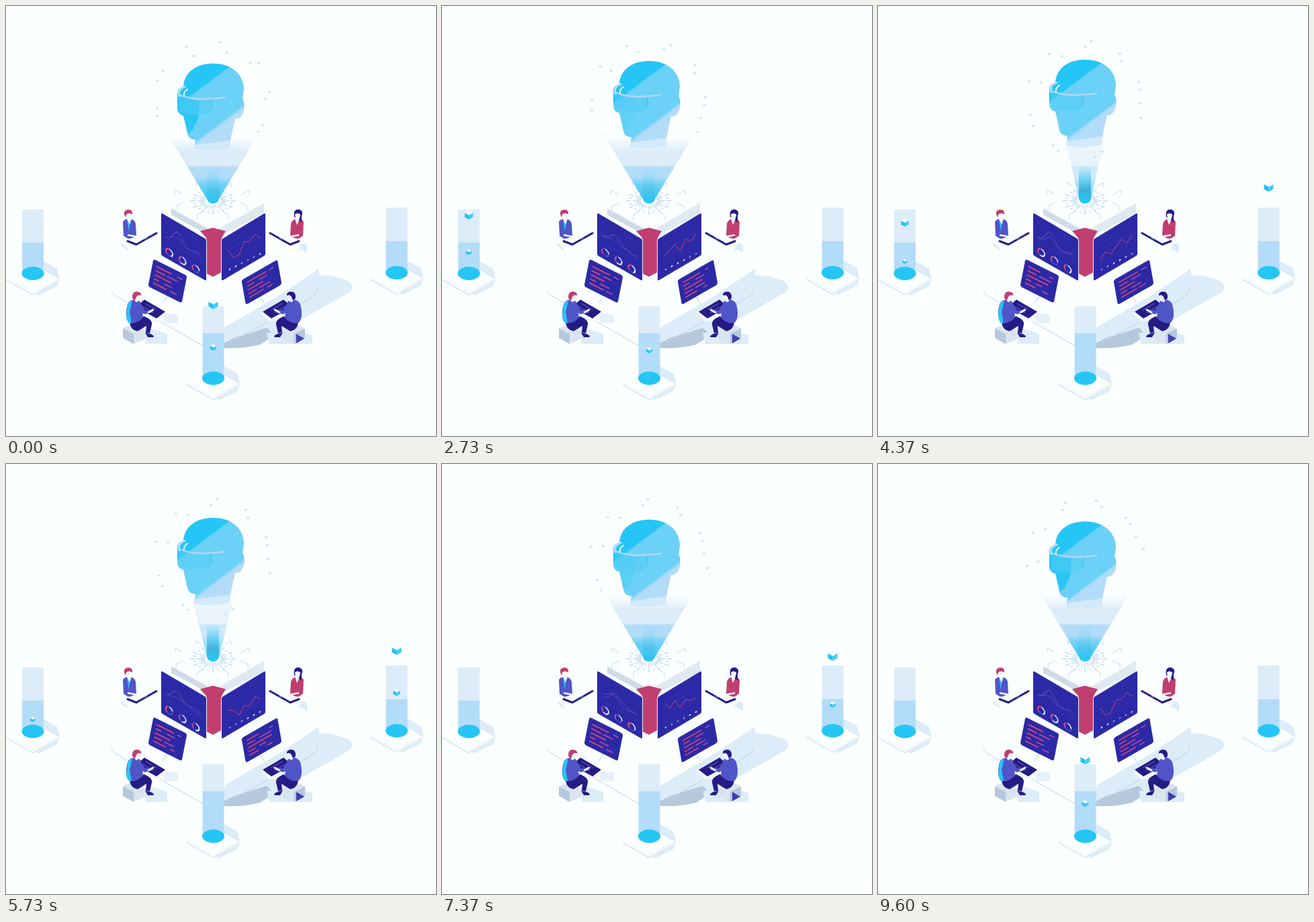
Write an HTML page that moves like this. It is 640 px wide and 640 px high and loops after 9.63 s.

```html
<!DOCTYPE html>
<html lang="en">
<head>
<meta charset="utf-8">
<title>Hologram lab</title>
<style>
  html, body { margin: 0; width: 100%; height: 100%; overflow: hidden; background: #fcffff; }
  svg { display: block; width: 100vw; height: 100vh; }
</style>
</head>
<body>
<svg id="stage" viewBox="0 0 640 640" fill="none"></svg>
<script>
const LOOP = 9630;
const C = {
  bg: '#fcffff', pale: '#dcecf8', soft: '#b3dcf9', mid: '#6bd1f6', bright: '#25c6f5', edge: '#bfd2e4',
  shade: '#b5c8dc', navy: '#251b84', screen: '#2b29a6', blue: '#5055c8', pink: '#c03f70', hot: '#e6496f'
};
const stage = document.getElementById('stage');
const shape = (d, fill, extra = '') => `<path d="${d}" fill="${fill}" ${extra}/>`;
const line = (d, stroke, width = 1, extra = '') =>
  `<path d="${d}" stroke="${stroke}" stroke-width="${width}" stroke-linecap="round" stroke-linejoin="round" ${extra}/>`;
const mirror = (x, body) => `<g transform="translate(${x} 0) scale(-1 1)">${body}</g>`;
const range = n => [...Array(n).keys()];
const times = (n, fn) => range(n).map(fn).join('');

// Projector pillars: x, top, colour split, disc height, chevron launch times (s)
const pillars = [
  { x: 40, top: 303, split: 352, disc: 398, launch: [1, 1.695, 2.26, 3.15, 3.8, 4.51] },
  { x: 581.5, top: 300, split: 350, disc: 397, launch: [4.22, 4.98, 5.525, 6.42, 7.1] },
  { x: 308.5, top: 447, split: 487, disc: 554, launch: [8.76, 9.35, 10.09, 10.79, 11.44] }
];
const FALL = 1.3;

function pillar({ x, top, split, disc, launch }, i) {
  const y = disc + 10;
  return shape(`M${x + 14} ${y - 29}L${x + 36} ${y - 17}L${x + 40} ${y - 1}L${x + 36} ${y + 9}L${x + 8} ${y + 23}L${x} ${y + 16}Z`, C.pale) +
    shape(`M${x - 40} ${y - 1}L${x} ${y - 23}L${x + 40} ${y - 1}V${y + 1}L${x} ${y + 23}L${x - 40} ${y + 1}Z`, C.bg) +
    line(`M${x - 39} ${y}L${x} ${y + 22}L${x + 39} ${y}`, C.edge) +
    line(`M${x - 39} ${y - 3}L${x} ${y + 18}L${x + 39} ${y - 3}`, '#e6f1f8', .8) +
    shape(`M${x - 16} ${top}h32V${split}h-32z`, C.pale) +
    shape(`M${x - 16} ${split}h32V${disc}h-32z`, C.soft) +
    `<ellipse cx="${x}" cy="${disc}" rx="16.5" ry="10" fill="${C.bright}"/>` +
    launch.map((_, n) => `<g id="chev${i}-${n}">${shape('M-7 -4L0 -8L7 -4L0 0Z', '#f4fbff')}` +
      shape('M-7 -4L0 0V7L-7 3Z', '#1fc0f2') + shape('M7 -4L0 0V7L7 3Z', '#3fccf6') + '</g>').join('');
}

const defs = `<defs>
  <linearGradient id="skin" gradientUnits="userSpaceOnUse" x1="264" y1="85" x2="336" y2="181">
    <stop offset=".37" stop-color="${C.bright}"/><stop offset=".39" stop-color="${C.mid}"/>
    <stop offset=".86" stop-color="${C.mid}"/><stop offset=".9" stop-color="${C.soft}"/></linearGradient>
  <linearGradient id="beam" gradientUnits="userSpaceOnUse" x1="0" y1="195" x2="0" y2="294">
    <stop stop-color="${C.pale}" stop-opacity="0"/><stop offset=".22" stop-color="${C.pale}"/><stop offset=".42" stop-color="${C.pale}"/>
    <stop offset=".46" stop-color="${C.soft}"/><stop offset=".6" stop-color="${C.soft}"/>
    <stop offset=".72" stop-color="${C.mid}"/><stop offset="1" stop-color="${C.bright}"/></linearGradient>
  <linearGradient id="core" gradientUnits="userSpaceOnUse" x1="0" y1="238" x2="0" y2="290">
    <stop stop-color="${C.mid}" stop-opacity="0"/><stop offset=".4" stop-color="${C.mid}"/>
    <stop offset=".7" stop-color="#3fb0d6"/><stop offset="1" stop-color="${C.bright}"/></linearGradient>
</defs>`;

const floor =
  shape('M157 422L308 335L465 422L330 500Q309 512 290 503Z', C.bg) +
  shape('M313 508L326 478L408 430L466 391V401L486 402L508 409Q524 419 506 429L420 478L400 490Q375 512 313 509Z', C.pale) +
  shape('M312 508L340 494L388 479L400 490L378 504Q348 512 312 508Z', C.shade) +
  line('M157 424Q159 430 168 434L290 504Q309 514 330 503L456 433Q465 428 464 421', C.edge);

const rays = times(24, i => {
  const a = i * Math.PI / 12, c = Math.cos(a), s = Math.sin(a);
  const seg = (r, q) => `M${308 + r * c} ${290 + r * s * .58}L${308 + q * c} ${290 + q * s * .58}`;
  return line(seg(13, i % 2 ? 19 : 23) + seg(27, i % 2 ? 29 : 33), '#cfe3f4', 2);
});

const platform =
  shape('M246 300L308 265L384 293V308L308 345L246 310Z', C.bg) +
  shape('M246 301L305 334V343L246 311Z', '#cfdbe6') +
  shape('M384 293V309L314 345V334Z', '#dfe9f1') +
  line('M246 301L305 333L314 333L384 293', '#edf4f9') +
  line('M252 280v-6l10 6M362 280v-6l-12 7M253 304v-6l10-5M360 304v-6l-11-5M285 318v-8l8-4M331 318v-7l-8-5M283 268v-5l7 5M335 270v-7l-8 5', '#c9dbe9') +
  rays +
  shape('M289 335L308 330L327 335L321 345V396L308 403L298 398V345Z', C.pink);

const monitor = d => shape(d, C.screen, 'stroke="#f1f6fd" stroke-width="2" stroke-linejoin="round" paint-order="stroke"');

const charts =
  monitor('M233 309L296 346Q298 347 298 349V407Q298 409 296 408L233 372Q231 371 231 369V310Q231 308 233 309Z') +
  monitor('M384 309L323 346Q321 347 321 349V407Q321 409 323 408L384 372Q386 371 386 369V310Q386 308 384 309Z') +
  `<g transform="matrix(1 .567 0 1 231 309)">
    ${line('M7 9h16M46 9h14M8 38h52', '#4541bb', 1, 'stroke-dasharray="2 3"')}
    <path id="waveA" stroke="#7444b2"/><path id="waveB" stroke="#4f48c2"/>
    ${times(3, i => `<g transform="translate(${12 + i * 19.7} ${51 + i}) rotate(-90)" stroke-width="1.8">
      <circle r="5" stroke="#4a4cc4"/><circle class="ringA" r="5" stroke="#e8e9fb"/><circle class="ringB" r="5" stroke="${C.hot}"/></g>`)}
  </g>
  <g transform="matrix(1 -.58 0 1 321 347)">
    ${times(4, i => line(`M9 ${13 + i * 9}H58`, '#403dba', .7, 'stroke-dasharray="2 2"'))}
    ${times(6, i => `<circle cx="${12 + i * 9}" cy="${52 + i * .6}" r="1.3" fill="#e9ebff" class="tick"/>`)}
  </g>
  <path id="trend" stroke="#cc416f" stroke-linejoin="round"/>`;

const rows = [[28, 8], [14, 18], [33, 0], [12, 15], [22, 10]];
const codeScreen = (matrix, id) => `<g transform="matrix(${matrix})">
  <rect width="50" height="40" rx="3" fill="${C.screen}"/>
  ${rows.map(([a, b], i) => `<g class="${id}" stroke-width="1.7">
    <path stroke="${C.hot}" d="M6 ${8 + i * 6}h${a}"/><path stroke="#b94d9b" d="M${9 + a} ${8 + i * 6}h${b}"/></g>`).join('')}</g>`;

const code =
  line('M240 432L234 441M377 432L384 441', '#d5e3ef', 2) +
  codeScreen('1 .5 -.2 1.02 219.5 376.5', 'codeL') + codeScreen('1.07 -.61 .16 .92 350.5 408', 'codeR');

// Standing colleague with a laptop
const standing = (hair, top, longHair) =>
  shape('M172 343L190 336L197 352L181 361Z', '#f7fbfe') + shape('M172 352L181 360V364L172 357Z', C.pale) +
  shape('M174 321Q178 316 184 317Q191 317 193 324L194 342Q187 347 181 346L175 342Z', top) +
  shape('M179 315L187 316L184 326Z', '#eef8fc') +
  (longHair ? shape('M177 308Q178 302 184 303Q190 306 188 314L177 322Z', hair) : shape('M180 318L184 326L183 336Z', C.bright)) +
  shape('M178 308Q184 306 187 310L186 318L181 319Z', '#f3f6fb') +
  shape('M176 310Q175 303 183 303Q189 304 188 310Q183 307 179 310L178 315Z', hair) +
  line('M182 341L193 343', '#f3f6fb', 2.5) +
  line('M181 350L194 355L224 338', C.navy, 3) + line('M207 347L210 345', '#8a8cd8', 1.2);

// Seated colleague with a keyboard
const seated = (hair, accent) =>
  shape('M174 480L190 472L208 483V495L190 503L174 494Z', '#d9e4ee') + shape('M174 480L190 488V503L174 494Z', C.shade) +
  shape('M190 450L206 438L240 457L228 469Q210 470 190 456Z', '#f4f8fc') +
  shape('M193 448L206 437L237 455L224 465Z', C.navy) + line('M203 447L219 456M208 443L224 452', '#5c55bd', 1.2) +
  shape('M184 468L206 462Q218 467 217 474L214 487L208 486L209 476L196 484Q184 482 184 468Z', C.navy) +
  shape('M207 486L215 488Q222 491 219 493H211Z', C.navy) +
  shape('M181 444Q184 437 192 437Q200 437 202 446L204 464Q193 475 183 471Q176 462 181 444Z', C.blue) +
  (accent ? shape('M181 444Q184 439 188 439L184 455L187 472Q180 473 179 462Z', C.bright) : '') +
  line('M198 444L206 456L217 454', C.blue, 5) + line('M212 456L219 452', '#eef4fb', 2.6) +
  shape('M192 429Q200 427 200 432L199 438L194 441L190 437Z', '#f1f5fb') +
  shape('M188 433Q188 425 195 425Q202 426 201 431Q196 429 194 433L192 438Q188 437 188 433Z', hair);

const people =
  shape('M208 478L240 488V503H208Z', C.pale) + shape('M388 487L425 480L456 490V503H392Z', C.pale) +
  shape('M232 456L256 460V472L236 472Z', '#e6f0f8') + shape('M437 352L448 356V367L436 361Z', C.pale) +
  standing(C.pink, C.blue, false) + mirror(617, standing(C.navy, C.pink, true)) +
  seated(C.pink, true) + mirror(619, seated(C.navy, false)) + shape('M432 488L444 495L432 502Z', '#403db8');

const head = `<g id="head">
  ${shape('M264 122C264 99 283 85.5 308 85.5C335 85.5 354 101 354 124L352 138Q356 143 354 156Q350 169 341 168L336 190L332 212Q306 219 280 213L282 199Q272 199 270 190L264 163Q255 161 255 152V130Q255 122 264 120Z', 'url(#skin)')}
  ${shape('M255 136L288 141L286 167L278 184L271 190L264 163Q255 161 255 152Z', C.bright, 'id="glow"')}
  ${shape('M280 207L334 200L331 214Q306 220 280 214Z', '#eaf4fc', 'opacity=".6"')}
  ${shape('M258 134Q282 144 306 139V153Q302 163 288 162L258 158Z', '#52cdf6', 'opacity=".55"')}
  ${line('M258 134Q255 123 266 120', '#b9dcf8', 3)}
  ${line('M260 133Q281 142 325 136', '#b5d8f7', 2.4)}
  ${line('M265 133Q264 128 270 124', '#eaf5fd', 2)}
  ${line('M306 139V154', '#48bde8', 1)}
</g>`;

// Angle (degrees) and radius of the orbiting specks
const specks = [[197, 87], [190, 84], [162, 87], [151, 85], [117, 87], [114, 70], [83, 85], [73, 72], [44, 77], [38, 86],
  [7, 85], [0, 78], [-28, 84], [-36, 83], [-50, 82], [-64, 88], [-117, 83], [-126, 88]];

stage.innerHTML = defs + floor + pillars.slice(0, 2).map(pillar).join('') + platform +
  `<path id="cone" fill="url(#beam)"/>` +
  shape('M299 238H317V287Q315 294 308 294Q301 294 299 287Z', 'url(#core)', 'id="column"') +
  specks.map(() => '<rect class="speck" x="-2" y="-1.5" width="4" height="3.4" rx="1" fill="#d3e6f6"/>').join('') +
  head + charts + people + code + pillar(pillars[2], 2);

const $ = id => document.getElementById(id);
const all = name => [...document.getElementsByClassName(name)];
const set = (el, attrs) => Object.entries(attrs).forEach(([k, v]) => el.setAttribute(k, v));
const clamp = v => Math.max(0, Math.min(1, v));
const mix = (a, b, p) => a + (b - a) * p;
const smooth = (a, b, v) => { const p = clamp((v - a) / (b - a)); return p * p * (3 - 2 * p); };
const parts = {
  speck: all('speck'), ringA: all('ringA'), ringB: all('ringB'), tick: all('tick'),
  codeL: all('codeL'), codeR: all('codeR')
};

const marks = [0, 1370, 2730, 4370, 5730, 7370, LOOP];
const spin = [0, 5.5, 29.5, 45.5, 48, 53, 72];
const trend = [
  [364, 374, 370, 351, 350, 340, 346], [376, 363, 369, 362, 353, 345, 336],
  [372, 363, 355, 365, 347, 350, 338], [378, 366, 369, 357, 347, 353, 340],
  [366, 367, 374, 360, 360, 346, 350], [356, 364, 352, 363, 350, 352, 349]
];
trend.push(trend[0]);

function between(t, fn) {
  const i = Math.max(0, marks.findIndex(m => m > t) - 1);
  return fn(i, (t - marks[i]) / (marks[i + 1] - marks[i]));
}

function moveChevrons(t) {
  const period = LOOP / 1000;
  pillars.forEach(({ x, disc, launch }, i) => launch.forEach((start, n) => {
    const age = ((t / 1000 - start) % period + period) % period;
    const el = $(`chev${i}-${n}`);
    if (age > FALL) return set(el, { opacity: 0 });
    const y = 94.3 - 244.3 * Math.exp(-.64 * age);
    const size = mix(1, .5, clamp((y + 110) / 95));
    set(el, {
      transform: `translate(${x} ${disc + y}) scale(${size})`,
      opacity: clamp(age / .12) * clamp((FALL - age) / .06)
    });
  }));
}

function wave(offset, height, phase) {
  return 'M' + range(27).map(i => {
    const u = 7 + i * 2;
    const hump = height * Math.exp(-(((u - 25) / 9) ** 2));
    return `${u} ${offset - hump + 2 * Math.sin(u / 5 + phase)}`;
  }).join('L');
}

function draw(now) {
  const t = now % LOOP, turn = 2 * Math.PI * t / LOOP, lift = (1 - Math.cos(turn)) / 2;
  set($('head'), { transform: `translate(0 ${-6 * lift})` });
  set($('glow'), { opacity: (1 - lift) ** 2 * .9 });

  const narrow = smooth(2800, 4100, t) - smooth(5500, 7000, t);
  const half = mix(65, 30, narrow);
  set($('cone'), {
    d: `M${308 - half} 195H${308 + half}L317 287Q315 294 308 294Q301 294 299 287Z`,
    opacity: mix(1, .6, narrow)
  });
  set($('column'), { opacity: mix(.35, 1, narrow) });

  const angle = between(t, (i, p) => mix(spin[i], spin[i + 1], p));
  parts.speck.forEach((el, i) => {
    const [base, r] = specks[i], a = (base + angle) * Math.PI / 180;
    const y = 138 - r * Math.sin(a);
    set(el, { transform: `translate(${308 + r * Math.cos(a)} ${y})`, opacity: y > 190 ? mix(.35, .9, narrow) : 1 });
  });

  set($('trend'), {
    d: 'M' + between(t, (i, p) => trend[i].map((y, n) => `${331 + n * 7.9} ${mix(y, trend[i + 1][n], p)}`)).join('L')
  });
  set($('waveA'), { d: wave(29, 13, 2 * turn) });
  set($('waveB'), { d: wave(31, 8, 1.5 - 3 * turn) });

  const arc = share => `${31.42 * share} ${31.42 * (1 - share)}`;
  parts.ringA.forEach((el, i) => set(el, { 'stroke-dasharray': arc(.4 + .2 * Math.sin(3 * turn + i * 2)) }));
  parts.ringB.forEach((el, i) => set(el, {
    'stroke-dasharray': arc(.26 + .1 * Math.cos(2 * turn + i)), 'stroke-dashoffset': -19
  }));
  parts.tick.forEach((el, i) => set(el, { opacity: .75 + .25 * Math.cos(turn - i) }));
  for (const [rowSet, shift] of [[parts.codeL, 0], [parts.codeR, 2]])
    rowSet.forEach((row, i) => [...row.children].forEach((bar, n) => {
      const share = .8 + .2 * Math.sin(4 * turn + i * 1.7 + n + shift);
      set(bar, { pathLength: 100, 'stroke-dasharray': `${100 * share} 200` });
    }));
  moveChevrons(t);
}

function tick() {
  draw(performance.now());
  requestAnimationFrame(tick);
}
tick();
</script>
</body>
</html>
```
